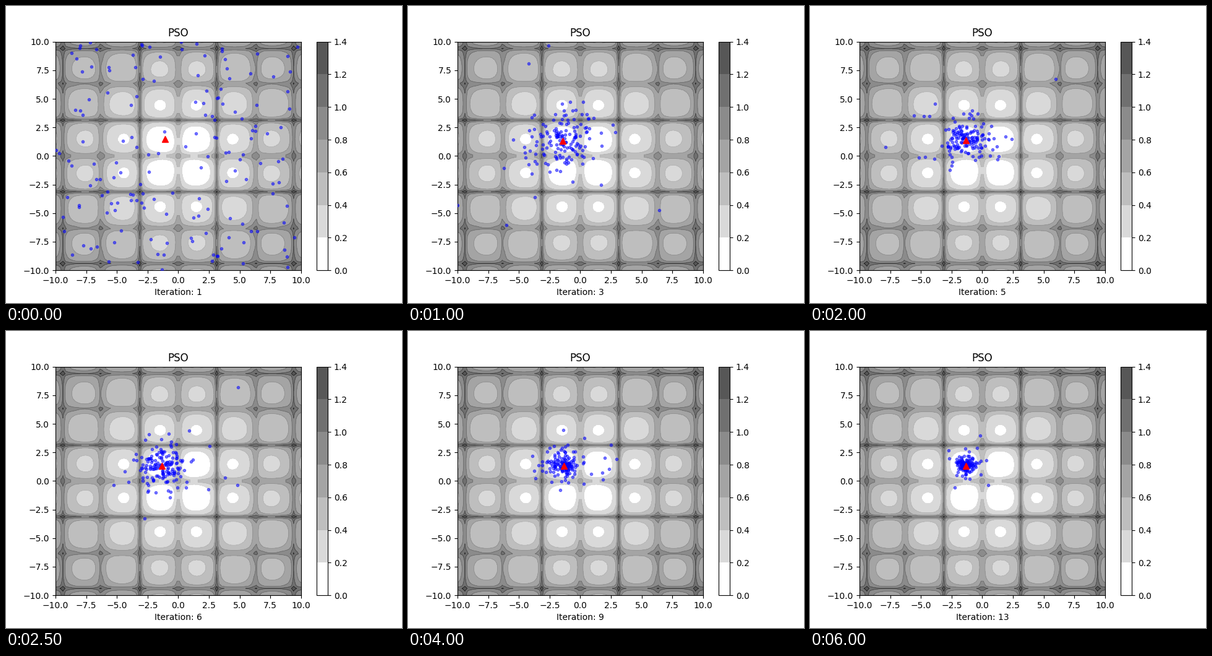
Recreate the animation shown at these times as a matplotlib script. Size 640 px wide and 480 px high, loop 6500 ms.

```python
import numpy as np
import matplotlib.pyplot as plt
from matplotlib.animation import FuncAnimation

SWARM = 160
ITERATIONS = 13
OPTIMUM = np.array([-1.34, 1.345])
FIRST_MISS = np.array([0.26, 0.155])


def cross_in_tray(x, y):
    """Cross-in-tray function, shifted so that its minimum is about zero."""
    bump = np.exp(np.abs(100 - np.hypot(x, y) / np.pi))
    return 2.06262 - 1e-4 * (np.abs(np.sin(x) * np.sin(y) * bump) + 1) ** 0.1


def best_at(i):
    """Best position, a damped swing around the optimum."""
    return OPTIMUM + FIRST_MISS * 0.55 ** i * np.cos(np.pi * i / 2)


def swarm_at(i):
    """Uniform start, then a shrinking cluster with far stragglers."""
    rng = np.random.default_rng(40 + i)
    if i == 0:
        return rng.uniform(-10, 10, (SWARM, 2))
    spread = 1.15 * np.exp(-0.13 * (i - 2)) + 1.2 * 0.1 ** (i - 1)
    tail = np.sqrt(rng.chisquare(3, (SWARM, 1)) / 3)
    return OPTIMUM + spread * rng.normal(size=(SWARM, 2)) / tail


fig, ax = plt.subplots(figsize=(6.4, 4.8), dpi=100)
axis = np.linspace(-10, 10, 100)
X, Y = np.meshgrid(axis, axis)
Z = cross_in_tray(X, Y)
levels = np.linspace(0, 1.4, 8)
greys = ["1.0", "0.85", "0.745", "0.645", "0.545", "0.44", "0.34"]
filled = ax.contourf(X, Y, Z, levels, colors=greys)
ax.contour(X, Y, Z, levels, cmap="gray_r", linewidths=0.6)
fig.colorbar(filled, ax=ax)

ax.set(xlim=(-10, 10), ylim=(-10, 10), title="PSO")
particles, = ax.plot([], [], "b.", alpha=0.5, zorder=3)
best, = ax.plot([], [], "r^", markersize=7, zorder=4)


def update(i):
    particles.set_data(*swarm_at(i).T)
    best.set_data(*best_at(i).reshape(2, 1))
    ax.set_xlabel(f"Iteration: {i + 1}")
    return particles, best


anim = FuncAnimation(fig, update, frames=ITERATIONS, interval=500,
                     repeat=True, repeat_delay=0)
plt.show()
```
